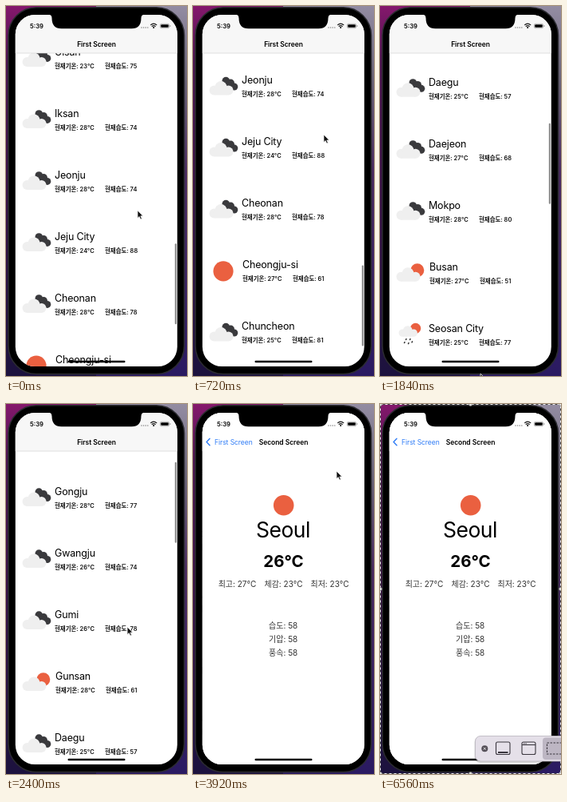
An HTML page that plays this animation: 227x463 px, repeating every 6640 ms.

```html
<!DOCTYPE html>
<html lang="ko">
<head>
<meta charset="utf-8">
<title>Weather app</title>
<style>
  html, body { margin: 0; width: 100%; height: 100%; overflow: hidden; background: #17102c; }
  svg { display: block; width: 227px; height: 463px; }
  text { font-family: Inter, "Noto Sans CJK KR", "Noto Sans CJK", sans-serif; fill: #000; }
  .name { font-size: 12.5px; letter-spacing: -.17px; }
  .info { font-size: 7.45px; font-weight: 600; fill: #111; }
  .bar { font-size: 8.5px; letter-spacing: -.05px; }
  .title { font-weight: 600; }
  .blue { fill: #2f7cf6; }
  .mid { text-anchor: middle; }
  .stat { font-size: 10px; fill: #333; text-anchor: middle; }
</style>
</head>
<body>
<svg viewBox="0 0 227 463">
  <defs>
    <linearGradient id="wallLeft" x2="0" y2="1">
      <stop offset="0" stop-color="#85186c"/>
      <stop offset=".15" stop-color="#4c1450"/>
      <stop offset=".5" stop-color="#3a1246"/>
      <stop offset="1" stop-color="#1c123e"/>
    </linearGradient>
    <linearGradient id="wallRight" x2="0" y2="1">
      <stop offset="0" stop-color="#938ca2"/>
      <stop offset=".2" stop-color="#6b6478"/>
      <stop offset=".45" stop-color="#4a2a60"/>
      <stop offset="1" stop-color="#2a1a62"/>
    </linearGradient>
    <clipPath id="screen"><rect x="11.8" y="11" width="203" height="440" rx="24.5"/></clipPath>
    <g id="cloud" fill="#efefef">
      <circle cx="26.5" cy="12.5" r="6"/>
      <circle cx="35" cy="8.5" r="7.5"/>
      <circle cx="44.5" cy="12.5" r="6"/>
      <rect x="25" y="9" width="21" height="9.5" rx="3"/>
    </g>
    <g id="overcast">
      <g fill="#3a3a3d">
        <circle cx="41.3" cy=".6" r="4.8"/>
        <circle cx="47.2" cy="3.4" r="4.8"/>
        <circle cx="51.8" cy="8" r="4.5"/>
        <circle cx="45" cy="6" r="4"/>
      </g>
      <use href="#cloud"/>
    </g>
    <g id="partly">
      <circle cx="46.800" cy="4.300" r="8.500" fill="#ea6040"/>
      <use href="#cloud"/>
    </g>
    <g id="rain">
      <circle cx="44.600" cy="0" r="6.600" fill="#ea6040"/>
      <use href="#cloud" transform="translate(7.500 -4) scale(.78)"/>
      <path d="M33 13.200l-.5 1M38 13.200l-.5 1M31 17.200l-.5 1M36 18.300l-.5 1M40.500 16.500l-.5 1" stroke="#333" stroke-width="1.500" stroke-linecap="round"/>
    </g>
    <g id="sun"><circle cx="38" cy="7.800" r="12.600" fill="#ea6040"/></g>
  </defs>

  <rect width="114" height="463" fill="url(#wallLeft)"/>
  <rect x="113" width="114" height="463" fill="url(#wallRight)"/>
  <rect x="3" y="1.800" width="220.500" height="458.700" rx="35" fill="#000" stroke="#2c2c31" stroke-width="1.500"/>

  <g clip-path="url(#screen)">
    <rect x="11" y="11" width="205" height="441" fill="#fff"/>
    <g id="first">
      <g id="list"></g>
      <rect id="thumb" x="211.800" width="2" height="101" rx="1" fill="#8a8a8a"/>
    </g>
    <g id="second">
      <rect x="11" y="11" width="205" height="441" fill="#fff"/>
      <circle cx="113.700" cy="126.700" r="12.800" fill="#ea6040"/>
      <text class="mid" x="113" y="166.500" font-size="26.500" letter-spacing="-.5">Seoul</text>
      <text class="mid" x="113.500" y="204.300" font-size="20.500" font-weight="700">26°C</text>
      <g id="stats"></g>
    </g>
    <g id="nav">
      <rect x="11" y="11" width="205" height="48" fill="#f7f7f7"/>
      <path d="M11 59h205" stroke="#cfcfcf" stroke-width=".6"/>
    </g>
    <rect id="plain" x="11" y="11" width="205" height="48" fill="#fff"/>
    <text id="title1" class="bar title mid" x="113.500" y="50.600">First Screen</text>
    <g id="back">
      <path d="M21 43.300l-4 4.200 4 4.200" fill="none" stroke="#2f7cf6" stroke-width="1.400" stroke-linecap="round" stroke-linejoin="round"/>
      <text id="backText" class="bar blue" x="27" y="50.600">First Screen</text>
    </g>
    <text id="title2" class="bar title mid" x="113.500" y="50.600">Second Screen</text>
    <text class="title" x="30" y="27.600" font-size="7.700">5:39</text>
    <g fill="#888">
      <circle cx="170" cy="27" r=".8"/><circle cx="172.600" cy="27" r=".8"/>
      <circle cx="175.200" cy="27" r=".8"/><circle cx="177.800" cy="27" r=".8"/>
    </g>
    <path d="M181.200 23.900q4-3.400 8 0M182.700 25.600q2.500-2 5 0" fill="none" stroke="#111" stroke-width="1.200"/>
    <circle cx="185.200" cy="27.100" r="1"/>
    <rect x="193.300" y="22.300" width="11.400" height="5.400" rx="1.700" fill="none" stroke="#888" stroke-width=".6"/>
    <rect x="194.200" y="23.200" width="9.600" height="3.600" rx="1"/>
    <path d="M205.800 24v2" stroke="#888" stroke-width=".8"/>
    <rect x="77.500" y="443.800" width="72" height="2.500" rx="1.250"/>
  </g>
  <path d="M53 10.500h121q-4.500 .3-4.500 4.500q0 13.300-12 13.300h-88q-12 0-12-13.300q0-4.200-4.500-4.500z"/>

  <g id="select">
    <rect x=".5" y=".5" width="226" height="462" fill="none" stroke="#444"/>
    <rect x=".5" y=".5" width="226" height="462" fill="none" stroke="#eee" stroke-dasharray="3 3"/>
    <g id="knobs" fill="#ddd" stroke="#777" stroke-width=".6"></g>
  </g>
  <g id="tools">
    <rect x="118.500" y="416" width="125" height="33" rx="7" fill="#000" opacity=".16"/>
    <rect x="119.500" y="415.500" width="125" height="31.500" rx="6.500" fill="#e5e0e9" stroke="#b9b4bd" stroke-width=".8"/>
    <rect x="204" y="417.500" width="30" height="27.500" rx="4" fill="#bdb6c3"/>
    <circle cx="131.300" cy="431.300" r="4" fill="#555058"/>
    <path d="M129.800 429.800l3 3m0-3l-3 3" stroke="#eee" stroke-width=".9"/>
    <g fill="none" stroke="#3b373f" stroke-width="1.100">
      <rect x="145.500" y="423" width="17.500" height="15.500" rx="2"/>
      <rect x="178" y="423" width="17" height="15.500" rx="2"/>
      <path d="M178 426.500h17"/>
      <rect x="209.500" y="424" width="22" height="14" stroke-dasharray="2.500 1.500"/>
    </g>
    <rect x="148" y="435" width="12.500" height="2" fill="#3b373f"/>
    <path d="M180 424.900h4" stroke="#3b373f" stroke-dasharray="1 .6"/>
  </g>
  <path id="cursor" d="M0 0v9.600l2.200-2 1.500 3.500 1.700-.7-1.500-3.400h3z" fill="#111" stroke="#fff" stroke-width=".7"/>
</svg>
<script>
  const LOOP = 6640, PITCH = 77;
  const $ = id => document.getElementById(id);
  const cities = `Seoul,27,57,rain Gongju,28,77 Gwangju,26,74 Gumi,26,78 Gunsan,28,61,partly
    Daegu,25,57 Daejeon,27,68 Mokpo,28,80 Busan,27,51,partly Seosan_City,25,77,rain
    Sokcho,24,72 Suwon,27,63 Suncheon,26,76 Ulsan,23,75 Iksan,28,74 Jeonju,28,74
    Jeju_City,24,88 Cheonan,28,78 Cheongju-si,27,61,sun Chuncheon,25,81`;

  $('list').innerHTML = cities.trim().split(/\s+/).map((row, i) => {
    const [name, temp, wet, icon = 'overcast'] = row.split(',');
    const x = icon === 'partly' || icon === 'sun' ? 62 : 61;
    return `<g transform="translate(0 ${84.6 + i * PITCH})">
      <use href="#${icon}"/>
      <text class="name" x="${x}" y="4.5">${name.replace('_', ' ')}</text>
      <text class="info" x="${x}" y="20.4">현재기온: ${temp}°C</text>
      <text class="info" x="${x + 63}" y="20.4">현재습도: ${wet}</text>
    </g>`;
  }).join('') + '<text id="detail" class="blue" x="170" y="89.2" font-size="8.6">Detail</text>';

  const stats = [['최고: 27°C', 55.5, 229], ['체감: 23°C', 113.5, 229], ['최저: 23°C', 171.5, 229],
    ['습도: 58', 113.2, 280.7], ['기압: 58', 113.2, 297.7], ['풍속: 58', 113.2, 314.7]];
  $('stats').innerHTML = stats.map(([s, x, y]) => `<text class="stat" x="${x}" y="${y}">${s}</text>`).join('');

  const xs = [0.5, 113.5, 226.5], ys = [0.5, 231.5, 462.5];
  $('knobs').innerHTML = xs.flatMap((x, i) => ys.map((y, j) =>
    i === 1 && j === 1 ? '' : `<circle cx="${x}" cy="${y}" r="2"/>`)).join('');

  // Each step: time, then values
  const scroll = [[0, 1028], [240, 1080], [480, 1122], [720, 1146.6], [960, 1150], [1200, 1030],
    [1520, 680], [1840, 375], [2160, 135], [2480, 25], [2720, 0]];
  const pointer = [[0, 165, 256], [720, 164, 161], [960, 160, 150], [1200, 155, 190], [1840, 126, 460],
    [2080, 126, 461], [2720, 178, 98], [3040, 180, 84], [4400, 180, 84], [4960, 212, 475]];

  const clamp = v => Math.max(0, Math.min(1, v));
  const ramp = (t, a, b) => clamp((t - a) / (b - a));
  function at(steps, t) {
    const n = steps.findIndex(s => s[0] > t);
    if (n < 0) return steps[steps.length - 1].slice(1);
    const a = steps[n - 1], b = steps[n], k = (t - a[0]) / (b[0] - a[0]);
    return a.slice(1).map((v, i) => v + (b[i + 1] - v) * k);
  }
  const move = (id, x, y) => $(id).setAttribute('transform', `translate(${x} ${y})`);
  const fade = (id, v) => $(id).setAttribute('opacity', v);

  function draw(t) {
    const [s] = at(scroll, t);
    const push = 1 - (1 - ramp(t, 3160, 3680)) ** 3;
    move('list', 0, -s);
    $('thumb').setAttribute('y', 60.7 + s * 0.23);
    fade('thumb', 1 - ramp(t, 3120, 3360));
    fade('detail', t < 2840 ? 0 : 0.9);
    fade('nav', clamp(s / 12));
    fade('plain', s > 0 ? 0 : 1);
    move('first', -62 * push, 0);
    move('second', 205 * (1 - push), 0);
    move('title1', -63 * push, 0);
    fade('title1', 1 - clamp(push * 1.5));
    fade('back', push);
    move('backText', 63 * (1 - push), 0);
    move('title2', 110 * (1 - push), 0);
    fade('title2', push);
    fade('select', t < 6160 ? 0 : 1);
    fade('tools', ramp(t, 6320, 6480));
    move('cursor', ...at(pointer, t));
  }

  const start = performance.now();
  function tick() {
    draw((performance.now() - start) % LOOP);
    requestAnimationFrame(tick);
  }
  tick();
</script>
</body>
</html>
```
